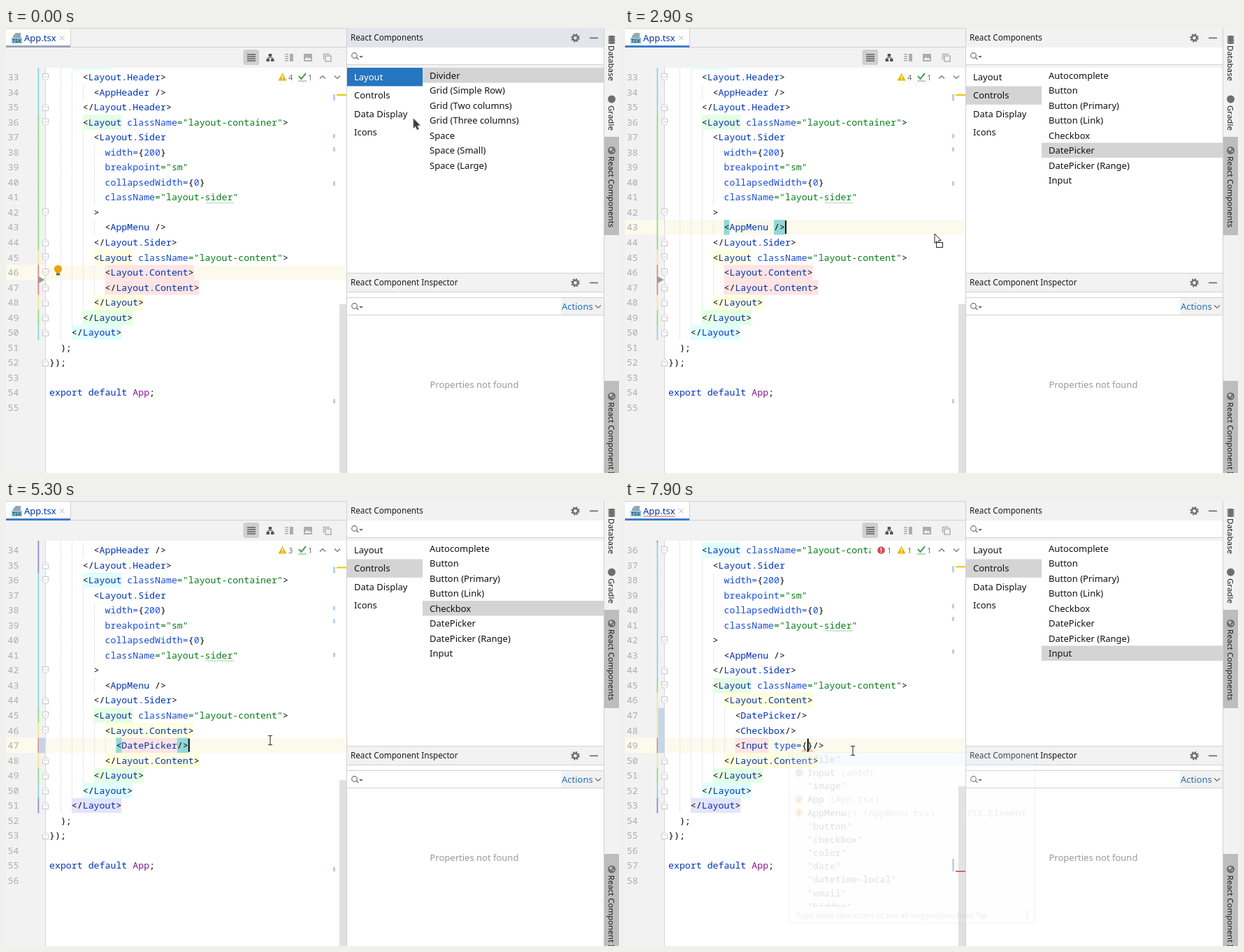
Write an HTML page with a canvas that moves like this. It is 877 by 638 pixels and loops after 8000 ms.

```html
<!DOCTYPE html>
<html lang="en">
<head>
<meta charset="utf-8">
<title>Dragging components into the editor</title>
<style>
html, body { margin: 0; width: 100%; height: 100%; overflow: hidden; background: #fff; }
canvas { display: block; }
</style>
</head>
<body>
<canvas id="stage" width="877" height="638"></canvas>
<script>
const g = document.getElementById('stage').getContext('2d');
const LOOP = 8000, STEP = 100;
const MONO = '13.25px "Noto Sans Mono", monospace';
const ui = size => `${size}px "Noto Sans", sans-serif`;
const GRAY = '#f2f2f2', EDGE = '#d1d1d1', ICON = '#6e6e6e', SELECTED = '#d4d4d4';
const CHAR = 7.95, ROW = 21.53, TOP = 59.7, LEFT = 62, EDITOR = 487;

const CODE = `    <Layout className="layout">
      <Layout.Header>
        <AppHeader />
      </Layout.Header>
      <Layout className="layout-container">
        <Layout.Sider
          width={200}
          breakpoint="sm"
          collapsedWidth={0}
          className="layout-sider"
        >
          <AppMenu />
        </Layout.Sider>
        <Layout className="layout-content">
          <Layout.Content>
          </Layout.Content>
        </Layout>
      </Layout>
    </Layout>
  );
});

export default App;
`.split('\n');
const FIRST = 32, CONTENT = 46;
const INSERTS = ['<DatePicker/>', '<Checkbox/>', '<Input type={}/>'];
const CATEGORIES = ['Layout', 'Controls', 'Data Display', 'Icons'];
const LAYOUTS = ['Divider', 'Grid (Simple Row)', 'Grid (Two columns)', 'Grid (Three columns)', 'Space', 'Space (Small)', 'Space (Large)'];
const CONTROLS = ['Autocomplete', 'Button', 'Button (Primary)', 'Button (Link)', 'Checkbox', 'DatePicker', 'DatePicker (Range)', 'Input'];
const SUGGESTIONS = ['"file"', 'Input (antd)', '"image"', 'App (App.tsx)', 'AppMenu() (AppMenu.tsx)', '"button"', '"checkbox"', '"color"', '"date"', '"datetime-local"', '"email"', '"hidden"'];
// Nesting colours, innermost tag first
const TAG_FILL = ['#ffe4e4', '#ffffe0', '#e4ffe4', '#e0ffff', '#e4e4ff'];
const TAG_BAR = ['#dc8089', '#f3e68a', '#86dc86', '#84d4e6', '#8f84d2'];

// Mouse path: time, x, y
const PATH = [
  [100, 583, 130], [600, 548, 100], [800, 541, 97], [900, 541, 97], [1100, 584, 107], [1200, 584, 107],
  [1400, 535, 94], [1500, 535, 94], [1800, 613, 137], [2400, 639, 177], [2600, 639, 177], [2800, 545, 235],
  [2900, 443, 295], [3000, 398, 325], [3200, 355, 349], [3600, 355, 349], [4000, 560, 220], [4300, 653, 148],
  [4600, 570, 215], [4900, 430, 315], [5200, 378, 343], [5400, 378, 343], [5800, 560, 255], [6100, 647, 217],
  [6500, 538, 267], [6700, 425, 322], [7000, 326, 358]];
const DRAGS = [[2700, 3500], [4400, 5300], [6200, 7100]];

// Number of listed moments already passed
const passed = (t, ...moments) => moments.filter(m => t >= m).length;

function mouseAt(t) {
  const i = PATH.findIndex(p => p[0] > t);
  if (i < 0) return PATH.at(-1).slice(1);
  if (!i) return PATH[0].slice(1);
  const [a, b] = [PATH[i - 1], PATH[i]], k = (t - a[0]) / (b[0] - a[0]);
  return [1, 2].map(j => a[j] + (b[j] - a[j]) * k);
}

function rect(color, x, y, w, h) {
  g.fillStyle = color;
  g.fillRect(x, y, w, h);
}
function text(s, x, y, color = '#111', font = ui(13), align = 'left') {
  g.font = font; g.fillStyle = color; g.textAlign = align;
  g.fillText(s, x, y);
}
function trace(points, close) {
  g.beginPath();
  for (let i = 0; i < points.length; i += 2) g.lineTo(points[i], points[i + 1]);
  if (close) g.closePath();
}
function line(color, width, ...points) {
  trace(points);
  g.strokeStyle = color; g.lineWidth = width;
  g.stroke();
}
function shape(fill, stroke, ...points) {
  trace(points, true);
  g.fillStyle = fill; g.fill();
  if (stroke) { g.strokeStyle = stroke; g.lineWidth = 1; g.stroke(); }
}
function disc(color, x, y, r) {
  g.beginPath(); g.arc(x, y, r, 0, 7);
  g.fillStyle = color; g.fill();
}
function ring(color, width, x, y, r, dash = []) {
  g.beginPath(); g.arc(x, y, r, 0, Math.PI * 2);
  g.setLineDash(dash);
  g.strokeStyle = color; g.lineWidth = width; g.stroke();
  g.setLineDash([]);
}
function wave(color, x, y, w) {
  const points = [];
  for (let i = 0; i <= w; i += 2) points.push(x + i, y + (i % 4 ? -1 : 1));
  line(color, 0.8, ...points);
}
const chevron = (x, y, dir, color = ICON) => line(color, 1.2, x - 4, y - 2 * dir, x, y + 2 * dir, x + 4, y - 2 * dir);

const TOKEN = /"[^"]*"|App(?=;)|[A-Z][\w.]*|export|default|[a-z]\w*=?(?=[={])|\d+|\S/g;
function tokenColor(s) {
  if (s === 'App') return '#871094';
  if (/^["=]/.test(s)) return '#067d17';
  if (/^([A-Z]|export|default)/.test(s)) return '#0033b3';
  if (/^\d/.test(s)) return '#1750eb';
  return /^[a-z]/.test(s) ? '#174ad4' : '#080808';
}
const colX = col => LEFT + CHAR * col;

function foldMark(y, up) {
  const d = up ? -1 : 1;
  shape('#fff', '#c4c4c4', 52.5, y - 5 * d, 60.5, y - 5 * d, 60.5, y + 1.5 * d, 56.5, y + 5 * d, 52.5, y + 1.5 * d);
  line('#c4c4c4', 1, 54.5, y - 0.5, 58.5, y - 0.5);
}

function drawEditor(t, mouse) {
  const count = passed(t, 3600, 5400, 7200);
  const active = passed(t, 3800, 5700, 7400);
  const focused = t >= 2900;
  const lines = CODE.slice();
  lines.splice(CONTENT - FIRST + 1, 0, ...INSERTS.slice(0, count).map(s => ' '.repeat(12) + s));
  const top = FIRST + 1 + count;
  const rowY = n => TOP + (n - top) * ROW;

  let caretLine = CONTENT + count, caretCol = count === 3 ? 25 : 12;
  const dropping = DRAGS.some(([a, b]) => t >= a && t < b + 100);
  if (dropping && mouse[0] < EDITOR) {
    caretLine = top + Math.floor((mouse[1] - TOP) / ROW);
    caretCol = Math.min(Math.round((mouse[0] - LEFT) / CHAR), lines[caretLine - FIRST].length);
  }

  g.save();
  g.beginPath(); g.rect(0, 57, EDITOR, 581); g.clip();
  rect('#fff', 0, 57, EDITOR, 581);
  rect(GRAY, 0, 57, 56, 581);
  rect('#fcfaed', 0, rowY(caretLine), EDITOR, ROW);
  rect('#d9d9d9', 56, 57, 1, 581);

  let level = -1;
  lines.forEach((source, i) => {
    const n = FIRST + i, y = rowY(n), mid = y + ROW / 2;
    const code = source.trim(), indent = source.length - code.length;
    const paired = code.match(/^<\/?Layout(\.Content)?(?=[ >])>?/);
    const closing = code.startsWith('</');
    const isActive = active && n === CONTENT + active;
    if (paired && !closing) level++;
    if (n >= top - 1) {
      const innermost = active ? 4 : 3;
      const depth = innermost - (isActive ? 4 : level);
      if (level >= 0) rect(TAG_BAR[depth], 45.5, y, 1.7, ROW + 0.3);
      for (let col = 2; col < indent; col += 2) rect('#e9e9e9', Math.round(colX(col)), y, 1, ROW + 0.3);
      const tag = isActive ? code.match(/^<\w+/) : paired;
      if (tag) rect(TAG_FILL[depth], colX(indent), y, tag[0].length * CHAR, ROW);
      if (focused && n === caretLine) {
        const end = code.match(/\/?>$/);
        if (code[0] === '<' && end && (caretCol === indent || caretCol === source.length)) {
          rect('#93d9d9', colX(indent), y, (closing ? 2 : 1) * CHAR, ROW);
          rect('#93d9d9', colX(source.length - end[0].length), y, end[0].length * CHAR, ROW);
        }
      }
      if (n > CONTENT && n <= CONTENT + count) rect('#c3d6e8', 47.5, y, 8.5, ROW + 0.3);
      text(n, 18.5, mid + 4.7, '#adadad', MONO, 'right');
      for (const m of source.matchAll(TOKEN)) text(m[0], colX(m.index), mid + 4.7, tokenColor(m[0]), MONO);
      if (closing || code === '});') foldMark(mid, true);
      else if (/^(<[^\/]*)?>$/.test(code)) foldMark(mid, false);
      if (code.includes('sider"')) wave('#7fc98a', 286, mid + 8, 40);
      if (code.includes('{}') && t >= 7400) wave('#e0433f', colX(24), mid + 8, 16);
    }
    if (paired && closing) level--;
  });
  if (!count) {
    const y = rowY(CONTENT + 1);
    shape('#9a9a9a', null, 46.5, y - 5, 55.5, y, 46.5, y + 5);
  }
  if (focused) rect('#000', colX(caretCol), rowY(caretLine) + 1, 2, 19);
  else {
    disc('#eda200', 74.5, 345.5, 5.5);
    rect('#eda200', 72, 349, 5, 3);
    rect('#5a5a5a', 72, 352, 5, 2.5);
  }

  // Scroll bar and change marks
  const markY = y => 57 + (y - 57) * (1 - 0.0145 * count);
  const bar = 396 + 4.3 * count;
  rect('#e0e0e0', 477, bar, 10, 638 - bar);
  [[95, 9], [152, 6], [171, 6]].forEach(([y, h]) => rect('#b5d0ee', 468, markY(y), 3, h));
  rect('#c9c9c9', 468, markY(220), 3, 6);
  if (count) rect('#b5d0ee', 468, 531 - 6 * count, 3, 6 * count);
  else rect('#c9c9c9', 468, 532, 3, 6);
  rect('#ebc700', 473, markY(95), 14, 2);
  if (t >= 7400) rect('#d64d49', 473, 530, 14, 2);

  // Inspection summary
  const failed = t >= 7700, small = ui(11);
  rect('#fff', failed ? 352 : 383, 60, (failed ? 352 : 383) < 360 ? 116 : 85, 21);
  if (failed) {
    disc('#d9444f', 366.5, 70.5, 5.3);
    rect('#fff', 365.7, 67, 1.6, 4.5); rect('#fff', 365.7, 72.5, 1.6, 1.6);
    text(1, 375, 74.5, ICON, small);
  }
  shape('#edb600', null, 395.5, 64.5, 401.5, 75.5, 389.5, 75.5);
  rect('#fff', 394.8, 68, 1.5, 4); rect('#fff', 394.8, 73, 1.5, 1.4);
  text(4 - passed(t, 3800, 5700, 7700), 404, 74.5, ICON, small);
  line('#4b9d5a', 2, 419, 69, 422.5, 73, 429, 65);
  wave('#4b9d5a', 418, 76, 12);
  text(1, 432, 74.5, ICON, small);
  chevron(453, 70.5, -1);
  chevron(474, 70.5, 1);
  g.restore();
}

function drawToolbar(t) {
  rect(GRAY, 0, 0, EDITOR, 57);
  rect(EDGE, 0, 27, EDITOR, 1);
  rect('#fff', 0, 0, 92, 27);
  rect(EDGE, 0, 0, EDITOR, 1);
  rect(EDGE, 92, 0, 1, 27);
  rect(t < 2900 ? '#9ca7b8' : '#3f7dc8', 0, 25, 92, 3);
  shape('#9aa7b0', null, 14, 7, 21, 7, 21, 14, 10, 14, 10, 11);
  rect('#86c5dd', 8, 14, 15, 8);
  text('TSX', 9, 21, '#24475a', 'bold 7px "Noto Sans", sans-serif');
  text('App.tsx', 26, 19.3, '#0033a5');
  if (t >= 7400) wave('#e0433f', 26, 22, 46);
  line('#b5b5b5', 1, 77, 11, 83.5, 17.5); line('#b5b5b5', 1, 83.5, 11, 77, 17.5);

  g.beginPath(); g.roundRect(339.5, 31, 22.5, 22, 3);
  g.fillStyle = '#cfcfcf'; g.fill();
  for (let i = 0; i < 4; i++) rect('#555', 345, 37.3 + i * 3, 12, 1.4);
  [[375.7, 37], [372.5, 44], [379, 44]].forEach(([x, y]) => rect('#555', x, y, 4.5, 4));
  line('#555', 1, 374.7, 44, 374.7, 42.5, 381.3, 42.5, 381.3, 44);
  line('#555', 1, 378, 41, 378, 42.5);
  const pale = '#adadad';
  for (let i = 0; i < 4; i++) rect(pale, 399, 37 + i * 3, 5, 1.5);
  rect(pale, 406, 37, 5, 11);
  rect(pale, 426, 37, 12, 11);
  shape(GRAY, null, 427, 46, 430.5, 41.5, 433, 44, 434.5, 42.5, 437, 46);
  g.strokeStyle = pale; g.lineWidth = 1.4;
  g.strokeRect(457, 40, 8, 8);
  line(pale, 1.4, 454.5, 45.5, 454.5, 37.5, 463, 37.5);
}

function panelHeader(title, y, color) {
  rect(color, 488, y, 367, 28);
  text(title, 493, y + 18.4, '#1a1a1a', ui(11.7));
  ring(ICON, 2.4, 814.5, y + 14.3, 3.6);
  ring(ICON, 2, 814.5, y + 14.3, 5.3, [2.1, 2.06]);
  rect(ICON, 835, y + 13.5, 12, 1.7);
}
function searchIcon(y) {
  ring(ICON, 1.2, 498.5, y - 0.5, 3.8);
  line(ICON, 1.4, 501, y + 2, 504.5, y + 5);
  shape(ICON, null, 505, y, 511, y, 508, y + 3);
}

function drawPanels(t) {
  rect('#fff', 488, 0, 367, 638);
  rect(EDGE, 487, 0, 1, 638);
  const focused = t < 2900, controls = t >= 600;
  panelHeader('React Components', 0, focused ? '#e2e6ec' : GRAY);
  searchIcon(40);
  rect(GRAY, 488, 52, 367, 5);
  rect(EDGE, 488, 52, 367, 1);

  CATEGORIES.forEach((name, i) => {
    const y = 57 + i * 26.4, on = i === +controls;
    if (on) rect(focused ? '#2675bf' : SELECTED, 488, y, 108, 26.4);
    text(name, 498, y + 18, on && focused ? '#fff' : '#111');
  });
  const chosen = [0, 5, 4, 7][passed(t, 2700, 4400, 6200)];
  (controls ? CONTROLS : LAYOUTS).forEach((name, i) => {
    const y = 57 + i * 21.5;
    if (i === chosen) rect(SELECTED, 596, y, 259, 21.5);
    text(name, 606, y + 15.6);
  });

  rect(EDGE, 488, 351, 367, 1);
  panelHeader('React Component Inspector', 351, GRAY);
  rect(EDGE, 488, 351, 367, 1);
  rect(EDGE, 488, 378, 367, 1);
  rect(EDGE, 488, 386, 367, 1);
  searchIcon(399);
  rect(GRAY, 794, 387, 61, 24);
  rect(EDGE, 488, 411, 367, 1);
  text('Actions', 795, 404, '#2470b3');
  chevron(847, 399.5, 1);
  text('Properties not found', 606.5, 516, '#999');
}

function sideText(s, y) {
  g.save();
  g.translate(862, y); g.rotate(Math.PI / 2);
  text(s, 0, 0, '#1a1a1a', ui(11.5));
  g.restore();
}
function globe(y) {
  disc(ICON, 866.5, y, 5.5);
  shape('#c8c8c8', null, 863, y - 2, 866, y - 4, 868, y - 2, 865, y + 1);
  shape('#c8c8c8', null, 867, y + 1, 870, y, 869, y + 3);
}
function drawSidebar() {
  rect(GRAY, 855, 0, 22, 638);
  rect('#bdbdbd', 855, 156, 22, 141);
  rect('#bdbdbd', 855, 506, 22, 132);
  rect(EDGE, 855, 0, 1, 638);
  for (let i = 0; i < 4; i++) {
    g.beginPath(); g.ellipse(866.5, 12.5 + i * 2.9, 5, 1.7, 0, 0, 7);
    g.fillStyle = ICON; g.fill();
  }
  sideText('Database', 25);
  disc(ICON, 866.5, 102, 5.5);
  sideText('Gradle', 111);
  globe(175.5);
  sideText('React Components', 184);
  globe(528);
  sideText('React Component Inspector', 536.5);
}

function drawPopup() {
  g.save();
  g.globalAlpha = 0.12;
  rect('#f7f7f7', 234, 360, 353, 246);
  g.strokeStyle = '#aaa'; g.lineWidth = 1;
  g.strokeRect(234.5, 360.5, 352, 245);
  rect('#c5dffc', 235, 361, 351, 18);
  g.beginPath(); g.rect(234, 360, 353, 222); g.clip();
  SUGGESTIONS.forEach((s, i) => {
    const y = 375 + i * 19.15, name = s.match(/^"?[\w-]+"?/)[0];
    text(name, 261, y, '#000', MONO);
    text(s.slice(name.length), 261 + name.length * CHAR, y, '#777', MONO);
  });
  [['C', 1, '#57b6d8'], ['v', 3, '#e9a23b'], ['f', 4, '#e9a23b']].forEach(([s, i, color]) => {
    disc(color, 249, 370.5 + i * 19.15, 6);
    text(s, 249, 374 + i * 19.15, '#333', ui(9), 'center');
  });
  text('JSX.Element', 575, 451.6, '#777', MONO, 'right');
  g.restore();
  g.save();
  g.globalAlpha = 0.12;
  text('Type more characters to see all suggestions.', 245, 598, '#777', ui(11));
  text('Next Tip', 474, 598, '#2470b3', ui(11));
  [589, 593, 597].forEach(y => disc(ICON, 575.5, y, 1.2));
  g.restore();
}

function drawCursor(t, [x, y]) {
  const dragging = DRAGS.some(([a, b]) => t >= a && t < b);
  const arrow = (fill, stroke) => shape(fill, stroke, x, y, x, y + 13.5, x + 3, y + 10.8, x + 5.2, y + 15.8, x + 7.5, y + 14.8, x + 5.3, y + 10, x + 9.3, y + 9.5);
  if (x >= EDITOR) {
    if (!dragging) return arrow('#3c3c3c', '#777');
    disc('#fff', x, y, 8);
    ring('#c2371f', 2, x, y, 7);
    line('#c2371f', 2, x - 5, y + 4.5, x + 5, y - 4.5);
  } else if (dragging) {
    arrow('#fff', '#222');
    g.fillStyle = '#fff'; g.fillRect(x + 2.5, y + 12.5, 9, 7);
    g.strokeStyle = '#222'; g.strokeRect(x + 2.5, y + 12.5, 9, 7);
  } else {
    line('#444', 1.2, x, y - 6, x, y + 6);
    [-6.5, 6.5].forEach(d => line('#444', 1.2, x - 3, y + d, x + 3, y + d));
  }
}

function frame(now) {
  const t = Math.floor(now % LOOP / STEP) * STEP;
  const mouse = mouseAt(t);
  drawEditor(t, mouse);
  drawToolbar(t);
  drawPanels(t);
  drawSidebar();
  if (t >= 7900) drawPopup();
  drawCursor(t, mouse);
  requestAnimationFrame(frame);
}
requestAnimationFrame(frame);
</script>
</body>
</html>
```
